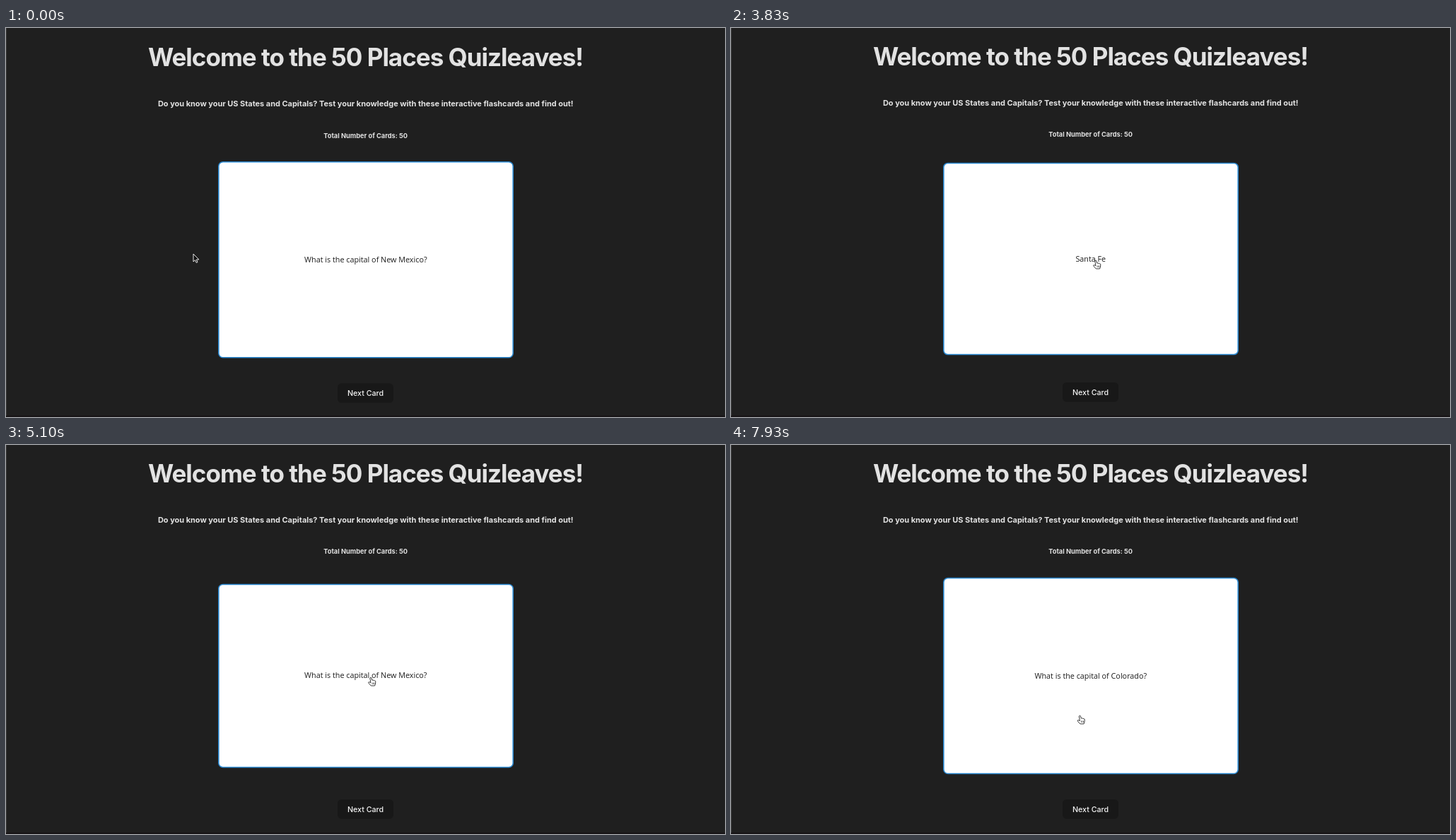
Animation, 1017 px wide and 551 px high, one loop 8000 ms. Source, as an HTML page:

```html
<!DOCTYPE html>
<html lang="en">
<head>
<meta charset="utf-8">
<title>Flashcards</title>
<style>
  html, body { margin: 0; width: 100%; height: 100%; overflow: hidden; background: #1f1f1f; }
  svg { display: block; width: 1017px; height: 551px; }
  text { text-anchor: middle; font-family: Inter, sans-serif; font-optical-sizing: none; fill: #e2e2e2; }
  .title { font-size: 35px; font-weight: 700; letter-spacing: -1px; }
  .lead { font-size: 10.96px; font-weight: 700; }
  .total { font-size: 9.25px; font-weight: 700; }
  .label { font-size: 10.7px; font-weight: 500; fill: #f4f4f4; }
  #answer { font: 10.8px "Open Sans", sans-serif; fill: #1c1c1c; }
</style>
</head>
<body>
<svg viewBox="0 0 1017 551">
  <rect width="1017" height="551" fill="#1f1f1f"/>
  <rect width="1" height="551" fill="#383838"/>
  <rect y="549" width="1017" height="2" fill="#171416"/>
  <g id="page">
    <text class="title" x="508.5" y="54.3">Welcome to the 50 Places Quizleaves!</text>
    <text class="lead" x="508.7" y="111.3">Do you know your US States and Capitals? Test your knowledge with these interactive flashcards and find out!</text>
    <text class="total" x="508.7" y="155.8">Total Number of Cards: 50</text>
    <g id="card">
      <rect x="300.8" y="189.8" width="416.4" height="277" rx="6" fill="#fff" stroke="#2a88d0" stroke-width="1.6"/>
      <text id="answer" x="508.8" y="332"></text>
    </g>
    <rect x="469" y="503.3" width="79" height="27.5" rx="5.5" fill="#181818"/>
    <text class="label" x="508.5" y="521">Next Card</text>
  </g>
  <rect id="scrollbar" x="1011" y="25" width="5.5" height="540" rx="2.7" fill="#6b6b6b"/>
  <g id="cursor">
    <path id="arrow" d="M0 0V11L2.6 8.7 4.2 12.4 6 11.6 4.4 8H7.8Z" fill="#111" stroke="#fff" stroke-width=".9"/>
    <g id="hand" fill="#fff" stroke="#222" stroke-width=".9" stroke-linejoin="round">
      <path d="M-1.2 1Q-.2-.6 .9 .8L1.8 4.2Q3 3.4 3.8 4.4 5 3.8 5.5 5 6.8 4.7 6.8 6.2L6.5 9 5.6 12H.3L-3 8.4Q-4 6.8-2.3 6.6L-.1 7.8Z"/>
      <path d="M2 7.5V10M3.5 7.5V10M5 7.5V10" stroke-width=".6"/>
    </g>
  </g>
</svg>
<script>
const LOOP = 8000, FLIP_MS = 1050, CARD_MID = 328.4;
const $ = id => document.getElementById(id);
const [page, card, answer, scrollbar, cursor, arrow, hand] =
  ['page', 'card', 'answer', 'scrollbar', 'cursor', 'arrow', 'hand'].map($);

const mix = (a, b, p) => a + (b - a) * p;
const ramp = (t, start, end) => Math.min(1, Math.max(0, (t - start) / (end - start)));
const easeOut = p => 1 - (1 - p) ** 2.8;

// cubic-bezier(.42, 0, .58, 1), solved by bisection
function easeInOut(x) {
  let lo = 0, hi = 1;
  for (let i = 0; i < 24; i++) {
    const s = (lo + hi) / 2, r = 1 - s;
    if (1.26 * s * r * r + 1.74 * s * s * r + s ** 3 < x) lo = s; else hi = s;
  }
  return lo * lo * (3 - 2 * lo);
}

// The pointer swings up over the card and off the top, returns, then visits card and button.
function pointerAt(t) {
  if (t < 1515) {
    const p = ramp(t, 30, 1270);
    return [mix(265, 541, p ** 3), mix(320, 6, p ** 2)];
  }
  if (t < 1770) return [563, -20];
  const enter = ramp(t, 1770, 2000);
  const toCard = easeInOut(ramp(t, 2770, 3530));
  const toButton = easeOut(ramp(t, 5480, 6270));
  const back = easeInOut(ramp(t, 6970, 7800));
  return [
    565 - 49 * toCard - 10 * toButton - 12.5 * back,
    9 + 72 * enter + 248 * toCard + 186 * toButton - 132 * back
  ];
}

function question(t) {
  if (t >= 3700 && t < 4970) return 'Santa Fe';
  return `What is the capital of ${t < 6620 ? 'New Mexico' : 'Colorado'}?`;
}

const flip = (t, start) => easeInOut(ramp(t, start, start + FLIP_MS));

function render(t) {
  const scroll = -2.4 * ramp(t, 2160, 2270) + 1.1 * ramp(t, 2760, 2900);
  page.setAttribute('transform', `translate(0 ${scroll})`);
  scrollbar.setAttribute('opacity', ramp(t, 2160, 2230) - ramp(t, 2770, 3000));

  const turn = flip(t, 3642) + flip(t, 4852);
  const scale = Math.abs(Math.cos(turn * Math.PI));
  card.setAttribute('transform', `translate(0 ${CARD_MID}) scale(1 ${scale}) translate(0 ${-CARD_MID})`);
  answer.textContent = question(t);

  const [x, y] = pointerAt(t);
  const overCard = x > 300 && x < 717 && y > 189 && y < 466;
  const overButton = x > 469 && x < 548 && y > 502 && y < 530;
  const pointing = overCard || overButton;
  cursor.setAttribute('transform', `translate(${x} ${y})`);
  hand.style.display = pointing ? '' : 'none';
  arrow.style.display = pointing ? 'none' : '';
}

function tick() {
  render(performance.now() % LOOP);
  requestAnimationFrame(tick);
}
tick();
</script>
</body>
</html>
```
